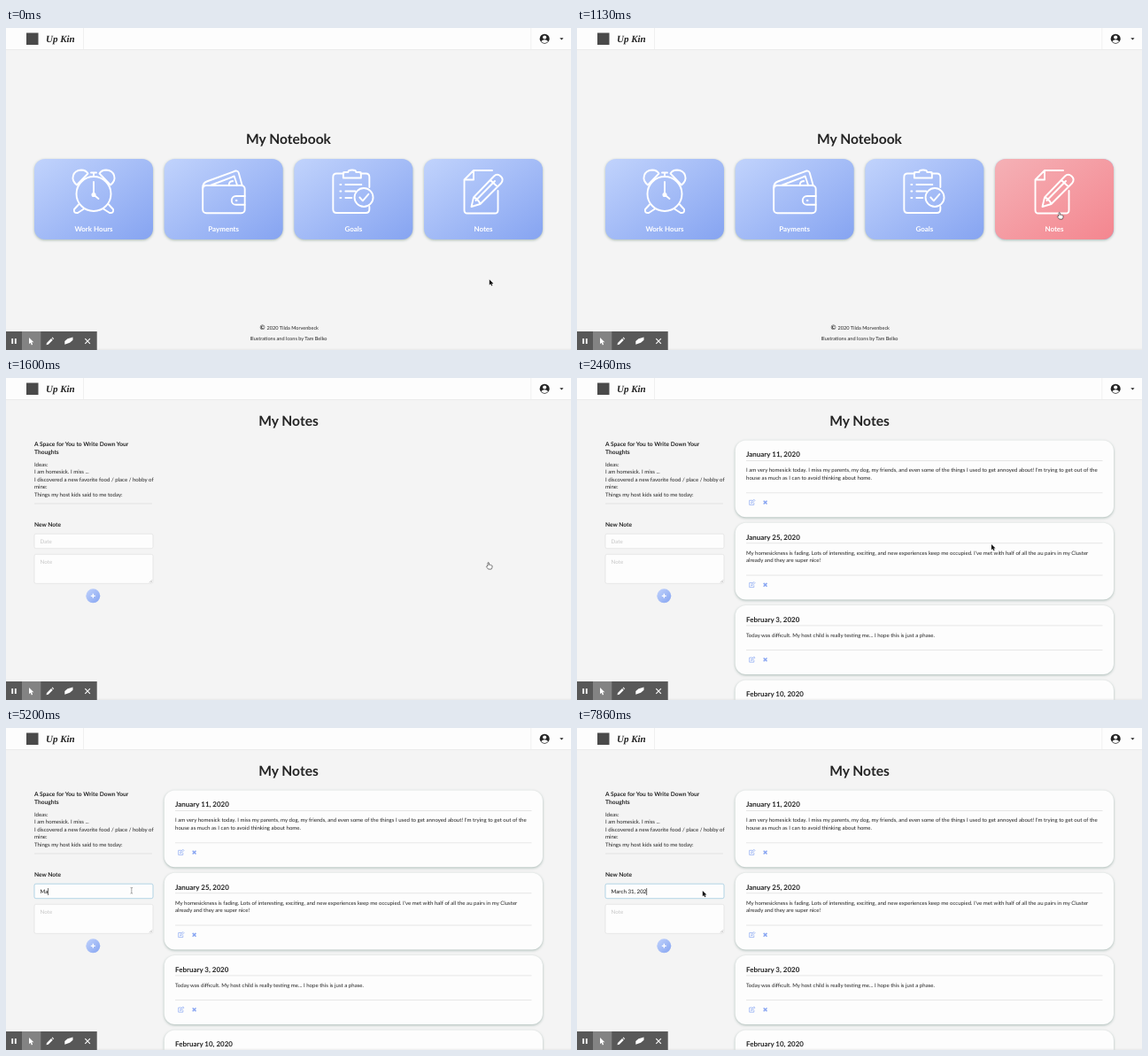
These frames come from a looping animation (638x364 px, 8 s). An HTML page:

```html
<!DOCTYPE html>
<html lang="en">
<head>
<meta charset="utf-8">
<title>My Notes</title>
<style>
  html, body { margin: 0; width: 100%; height: 100%; overflow: hidden; background: #f4f4f4; }
  svg { display: block; width: 100%; height: 100%; }
  text { font-family: Lato, sans-serif; white-space: pre; text-rendering: geometricPrecision; }
  .line { fill: none; stroke: #fff; stroke-width: 1.9; stroke-linejoin: round; stroke-linecap: round; }
  .soft { filter: drop-shadow(0 1.1px 1.5px #a8b9b4); }
</style>
</head>
<body>
<svg id="stage" viewBox="0 0 638 364">
  <defs>
    <linearGradient id="blue" x2="1" y2="1"><stop stop-color="#c1d3fc"/><stop offset="1" stop-color="#86a4f1"/></linearGradient>
    <linearGradient id="red" x2="1" y2="1"><stop stop-color="#f5b1b6"/><stop offset="1" stop-color="#f4868f"/></linearGradient>
  </defs>
</svg>
<script>
const INK = '#242424', HINT = '#c6c6c6', FIELD = 6.2, PARAGRAPH = 6.09;
const LOOP = 8000, REGISTER = 1460, NOTES = 1600, CARDS = 1860, FOCUS = 4400, CARET = 4530;

const text = (x, y, s, { size = FIELD, fill = INK, bold, mid, extra = '' } = {}) =>
  `<text x="${x}" y="${y}" font-size="${size}" fill="${fill}" ${bold ? 'font-weight="700"' : ''} ${mid ? 'text-anchor="middle"' : ''} ${extra}>${s}</text>`;
const rect = (x, y, w, h, fill, r = 0, extra = '') =>
  `<rect x="${x}" y="${y}" width="${w}" height="${h}" rx="${r}" fill="${fill}" ${extra}/>`;
const path = (d, fill = 'none', extra = '') => `<path d="${d}" fill="${fill}" ${extra}/>`;
const circle = (x, y, r, fill, extra = '') => `<circle cx="${x}" cy="${y}" r="${r}" fill="${fill}" ${extra}/>`;
const group = (id, body) => `<g id="${id}">${body}</g>`;
const at = (x, y, body) => `<g transform="translate(${x} ${y})">${body}</g>`;
const rule = (x1, x2, y, color = '#d6d6d6') => path(`M${x1} ${y}H${x2}`, 'none', `stroke="${color}" stroke-width=".6"`);
const title = (y, s) => text(319, y, s, { size: 15.6, bold: 1, mid: 1 });
const paragraph = (x, y, s) => text(x, y, s, { size: PARAGRAPH });
const box = (x, y, w, h, extra = '') => rect(x, y, w, h, '#fdfdfd', 1.8, `stroke="#dcdcdc" stroke-width=".6" ${extra}`);

// Navigation bar
const navigation =
  rect(0, 0, 638, 24.2, '#fdfdfd', 0, 'style="filter:drop-shadow(0 .7px .6px #aaa)"') +
  rect(23, 5.5, 13.5, 13.5, '#4a4a4a') +
  group('brand', '<text x="45" y="16.3" fill="#222" style="font:italic 700 11px Liberation Serif,serif">Up Kin</text>') +
  path('M0 0V24', 'none', 'id="divider" stroke="#e6e6e6" stroke-width=".6"') +
  path('M592.8 0V24', 'none', 'stroke="#e6e6e6" stroke-width=".6"') +
  circle(608.2, 12.2, 5.5, INK) + circle(608.2, 10.5, 2.1, '#fff') +
  path('M604.3 15.2q1-2 3.9-2t3.9 2q-1.5 1.8-3.9 1.8t-3.9-1.8', '#fff') +
  path('M625.3 11.2h4.200l-2.100 2.200z', INK);

// Home screen
const bell = 'M-19 177.5C-27 171-23.500 161-14 160.500-10 160.500-8 162-6.500 164.500Z';
const foot = 'M-17 199.500l-5 5.500q-1 4.500 4 4l7-4.500';
const mirrored = d => path(d) + `<g transform="scale(-1 1)">${path(d)}</g>`;
const icons = {
  'Work Hours': circle(0, 187.5, 19.5, 'none') + mirrored(bell) + mirrored(foot) +
    path('M0 168V164M-3 163.500H3M0 174V188.500L5.500 193') + circle(0, 188.5, 1.6, '#fff'),
  Payments: rect(-23.5, 178, 47.5, 31.3, 'none', 4) +
    path('M24 190H14a4.800 4.800 0 0 0 0 9.800H24M-23.500 182Q-24 175.500-19 173.500L13.500 161.500Q16 161 17 163.500L21 178M-15 178L12 167.500 15.500 178M6 178q0-5 4.500-5') +
    circle(14.5, 195, .4, '#fff'),
  Goals: path('M-11 164.500H-19q-4 0-4 4V205q0 4 4 4H14q4 0 4-4V202M8 164.500H14q4 0 4 4V180M-11.500 169.500V164q0-1 1-1H-6q0-2.500 4.500-2.500T3 163H7.500q1 0 1 1V169.500ZM-15 177H-14M-9 177H9M-15 184.500H-14M-9 184.500H2M-15 192H-14M-9 192H-2') +
    circle(11.7, 191.5, 10.5, 'none') + path('M7 191.500l3.500 3.800 6.500-7.500'),
  Notes: path('M10 161H-11L-21.500 171.500V206q0 3.500 3.500 3.500H13q3.500 0 3.500-3.500V184M-11 161V171.500H-21.500M-13.500 202l2.500-10.500L12 167.500q3.500-3.500 7.500 0t.5 8L-3.500 199ZM-11 191.500q5 1.500 7.500 7.500M8 172l8 7.500M-8.500 195L13 173')
};
const tiles = Object.keys(icons).map((name, i) => {
  const shape = (fill, extra) => rect(-67, 148, 134, 91, fill, 12, extra);
  return at(99 + i * 146.67, 0, shape('url(#blue)', 'class="soft"') +
    (name === 'Notes' ? shape('url(#red)', 'id="hover"') : '') +
    `<g class="line">${icons[name]}</g>` + text(0, 230.4, name, { size: 7.97, fill: '#fff', bold: 1, mid: 1 }));
}).join('');
const home = title(130.9, 'My Notebook') + tiles +
  text(286.4, 341, '©', { size: 7.4, bold: 1 }) + text(294.6, 340.5, '2020 Tilda Morvenbeck', { size: 5.6 }) +
  text(319, 353.3, 'Illustrations and Icons by Tam Belko', { size: 5.6, mid: 1 });

// Register screen
const GREY = '#6c6c6c';
const person = circle(0, -1.5, 1.8, GREY) + path('M-3 3V2Q-3 .3 0 .3T3 2V3Z', GREY);
const glyphs = {
  person,
  people: `<g transform="scale(.75)">${at(-3.2, -.3, person)}${at(3.2, -.3, person)}${at(0, .6, person)}</g>`,
  mail: rect(-3, -2.2, 6, 4.6, GREY, .5) + path('M-3-1.200L0 .8 3-1.200', 'none', 'stroke="#fff" stroke-width=".5"'),
  lock: rect(-2.5, -.4, 5, 3.6, GREY, .5) + path('M-1.500 0V-1.500a1.500 1.500 0 0 1 3 0V0', 'none', `stroke="${GREY}" stroke-width=".8"`)
};
const label = (y, s) => text(124, y, s, { size: 5.76, bold: 1 });
const input = (x, y, w, glyph, hint) => box(x, y, w, 16.5) + at(x + 9, y + 8, glyphs[glyph]) + text(x + 17, y + 10.5, hint, { fill: HINT });
const select = (y, s) => box(124, y, 390, 16.5) + text(128, y + 10.6, s, { fill: '#111' }) +
  path(`M508.400 ${y + 7.6}h3.600l-1.800-2.500zM508.400 ${y + 9}h3.600l-1.800 2.500z`, '#111');
const button = (x, y, w, h, s) => rect(x, y, w, h, 'url(#blue)', 1.8) + text(x + w / 2, y + h / 2 + 2.2, s, { fill: '#fff', bold: 1, mid: 1 });
const register = title(53.8, 'Register') +
  ['I am a', "Your Host Family's ID", 'Your Name', 'Home Country', 'E-Mail', 'Password'].map((s, i) => label(83 + i * 33.22, s)).join('') +
  select(87.2, 'Choose One') + input(124, 120.4, 390, 'people', 'Host Family ID') +
  input(124, 153.6, 192, 'person', 'First Name') + input(322, 153.6, 192, 'person', 'Last Name') +
  select(186.9, 'Select Country') + input(124, 220.1, 390, 'mail', 'E-Mail') + input(124, 253.3, 390, 'lock', 'Password') +
  button(297, 276, 42, 16.5, 'Register') +
  rect(124.3, 298.3, 389.5, 41.5, '#fdfdfd', 1.8, 'stroke="#c9c9c9" stroke-width=".6"') +
  text(319, 311.3, 'Already have an account?', { mid: 1 }) + button(301, 317.6, 35, 16.5, 'Log In');

// Notes screen
const BLUE = '#89a6f2';
const noteCard = (top, bottom, date, lines) =>
  rect(178.7, top, 427.3, bottom - top, '#fdfdfd', 12, 'class="soft"') +
  text(191, top + 18.9, date, { size: 7.97, bold: 1 }) + rule(191, 593.5, top + 23) +
  lines.map((s, i) => paragraph(191, top + 35.9 + i * 8.6, s)).join('') +
  rule(191, 593.5, bottom - 27.4) +
  at(197.5, bottom - 16.6,
    path('M1-2.300H-2.800V2.800H2.300V.5M-.8 1L-.5-.5 2.500-3.300 3.500-2.300.7.6Z', 'none', `stroke="${BLUE}" stroke-width=".7"`) +
    path('M13.200-1.900l3.800 3.800m0-3.800l-3.800 3.800', 'none', `stroke="${BLUE}" stroke-width="1.500"`));
const noteCards =
  noteCard(70.5, 157.2, 'January 11, 2020', [
    "I am very homesick today. I miss my parents, my dog, my friends, and even some of the things I used to get annoyed about! I'm trying to get out of the",
    'house as much as I can to avoid thinking about home.']) +
  noteCard(163.7, 250.4, 'January 25, 2020', [
    "My homesickness is fading. Lots of interesting, exciting, and new experiences keep me occupied. I've met with half of all the au pairs in my Cluster",
    'already and they are super nice!']) +
  noteCard(256.9, 335, 'February 3, 2020', ['Today was difficult. My host child is really testing me... I hope this is just a phase.']) +
  noteCard(341.5, 428, 'February 10, 2020', []);
const heading = (y, s) => text(32, y, s, { size: 6.64, bold: 1 });
const notes = title(53.8, 'My Notes') +
  heading(77.2, 'A Space for You to Write Down Your') + heading(85.7, 'Thoughts') +
  [[100.2, 'Ideas:'], [107.8, 'I am homesick. I miss ...'], [117.3, 'I discovered a new favorite food / place / hobby of'],
   [124.8, 'mine:'], [134.4, 'Things my host kids said to me today:']].map(([y, s]) => paragraph(32, y, s)).join('') +
  rule(32, 165, 142) + heading(168, 'New Note') +
  box(32, 176.2, 134, 16.5, 'id="field"') + text(38.6, 187, 'Date', { extra: 'id="entry"' }) + rect(0, 181, .6, 8, '#111', 0, 'id="caret"') +
  box(32, 199.3, 134, 33) + text(38.6, 210.1, 'Note', { fill: HINT }) +
  path('M162 231.300l3-3M163.700 231.300l1.300-1.300', 'none', 'stroke="#888" stroke-width=".5"') +
  circle(98.3, 246.3, 8, 'url(#blue)') + path('M95.800 246.300h5M98.300 243.800v5', 'none', 'stroke="#fff" stroke-width="1.300"') +
  group('cards', noteCards);

// Recorder toolbar and pointer
const arrow = 'M0 0V6.300L1.500 5 2.500 7.300 3.600 6.800 2.600 4.600H4.600Z';
const toolbar = rule(0, 638, 363.2, '#dedede') + rect(0, 343, 102.7, 21, '#585858') + rect(18, 343, 21.3, 21, '#838383') +
  path('M6.300 351h1.800v6h-1.800zM9.900 351h1.800v6h-1.800z', '#fff') +
  at(26, 350, path(arrow, '#fff', 'transform="scale(1.150)"')) +
  path('M45.500 358.200l.5-2.300 5-5 1.800 1.800-5 5zM51.600 350.300l.8-.8 1.800 1.800-.8.800z', '#fff') +
  path('M66.300 354l3.200-2.800 6-1.700v3.300l-3.500 2.900-5.700 2z', '#fff') +
  path('M89.300 351.200l5.600 5.600m0-5.600l-5.600 5.600', 'none', 'stroke="#fff" stroke-width="1.100"');
const pointer = group('pointer',
  group('arrow', path(arrow, '#111', 'stroke="#fff" stroke-width=".6" paint-order="stroke"')) +
  group('hand', path('M-.6 4V.3q.7-1 1.400 0V2.600q1-.5 1.400.2 1-.3 1.300.4 1-.1 1 .9 0 2-1 3.400H0Q-1.200 6-2.200 4.600-1.800 3.500-.6 4Z', '#fff', 'stroke="#222" stroke-width=".6"')) +
  group('beam', path('M-1.300-3.300Q0-3.300 0-2.500 0-3.300 1.300-3.300M0-2.500V2.700M-1.300 3.500Q0 3.500 0 2.700 0 3.500 1.300 3.500', 'none', 'stroke="#555" stroke-width=".5"')));

const stage = document.getElementById('stage');
stage.innerHTML += navigation + group('home', home) + group('register', register) + group('notes', notes) + toolbar + pointer;
const el = id => document.getElementById(id);
const show = (id, on) => { el(id).style.display = on ? '' : 'none'; };

// Time, x, y
const route = [
  [0, 545.8, 284.3], [60, 545.8, 284.3], [800, 544.6, 208.6], [2200, 544.6, 208.6], [2460, 468.3, 188],
  [2800, 350.5, 185], [3000, 350.5, 185], [3330, 193, 191], [3540, 193, 191],
  [3930, 146.5, 182.1], [4400, 141.8, 183.6], [LOOP, 141.8, 183.9]
];
const typed = 'March 31, 202';
const keyTimes = [4800, 5200, 5330, 5600, 5730, 5860, 6330, 6660, 6930, 7060, 7530, 7730, 7860];

function pointerAt(t) {
  const i = route.findIndex(k => k[0] > t), [t0, x0, y0] = route[i - 1], [t1, x1, y1] = route[i];
  const p = (t - t0) / (t1 - t0);
  return [x0 + (x1 - x0) * p, y0 + (y1 - y0) * p];
}

function draw(t) {
  const onRegister = t >= REGISTER && t < NOTES, onNotes = t >= NOTES;
  show('home', t < REGISTER);
  show('register', onRegister);
  show('notes', onNotes);
  show('cards', t >= CARDS);
  show('brand', !onRegister);
  el('divider').setAttribute('transform', `translate(${onRegister ? 98 : 87.5} 0)`);

  const fade = Math.min(1, Math.max(0, (t - 560) / 540));
  el('hover').setAttribute('opacity', fade * fade * (3 - 2 * fade));

  const [x, y] = pointerAt(t);
  const kind = t < 2200 ? (y < 239 ? 'hand' : 'arrow') : x < 166 && t < 6000 ? 'beam' : 'arrow';
  el('pointer').setAttribute('transform', `translate(${x} ${y})`);
  for (const k of ['arrow', 'hand', 'beam']) show(k, k === kind);

  const count = keyTimes.filter(k => k <= t).length, entry = el('entry');
  entry.textContent = count ? typed.slice(0, count) : 'Date';
  entry.setAttribute('fill', count ? '#111' : HINT);
  el('field').setAttribute('stroke', t >= FOCUS ? '#85bdd9' : '#dcdcdc');
  show('caret', t >= CARET);
  if (t >= CARET) el('caret').setAttribute('x', 38.7 + (count ? entry.getComputedTextLength() : 0));
}

function tick() {
  draw(performance.now() % LOOP);
  requestAnimationFrame(tick);
}
tick();
</script>
</body>
</html>
```
